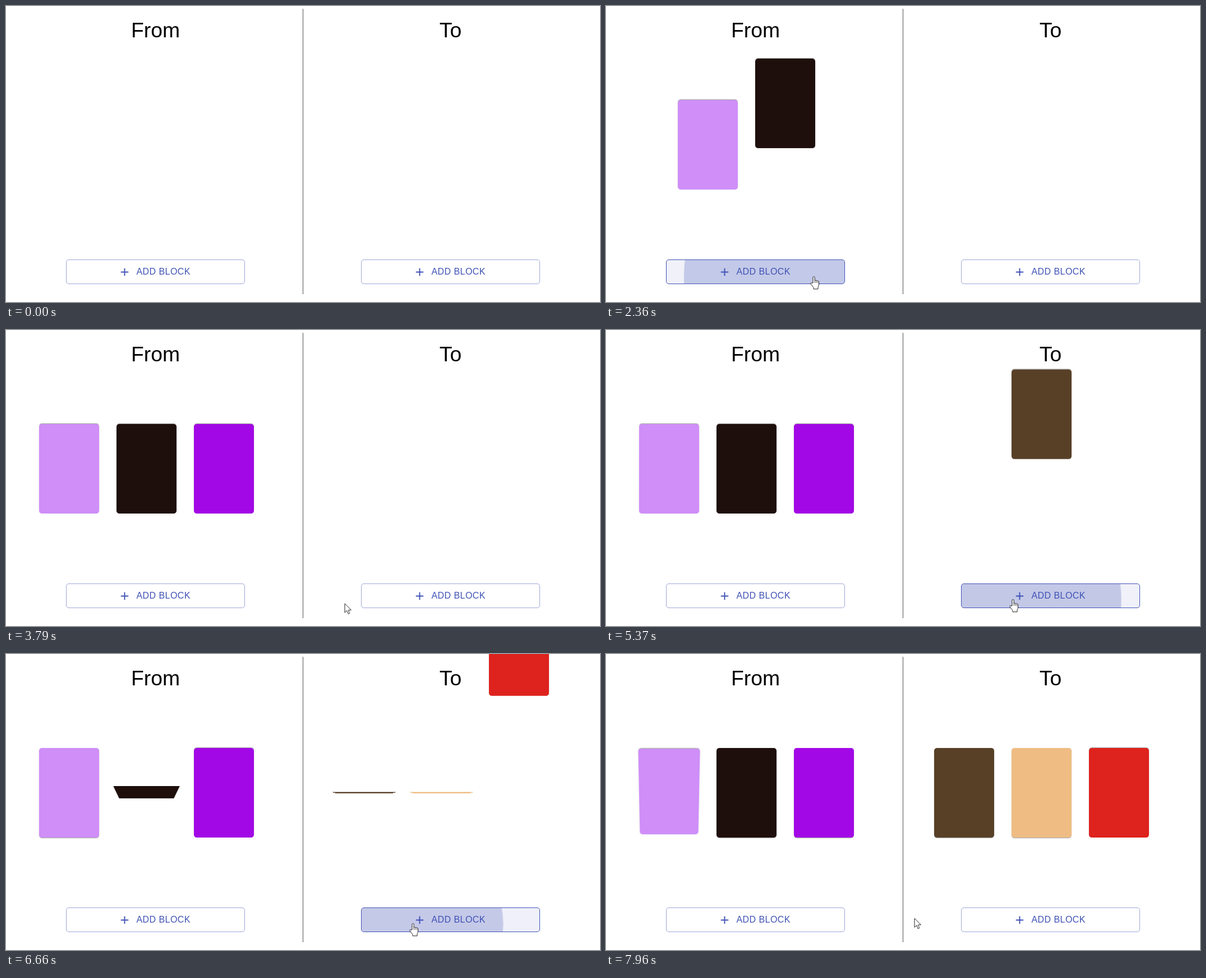
These frames come from a looping animation (1059x529 px, 7.99 s). An HTML page:

```html
<!DOCTYPE html>
<html lang="en">
<head>
<meta charset="utf-8">
<title>From / To blocks</title>
<style>
  html, body { margin: 0; width: 100%; height: 100%; overflow: hidden; background: #fff; }
  body { position: relative; font-family: "Liberation Sans", Arial, sans-serif; }
  body * { position: absolute; box-sizing: border-box; }
  h1 { margin: 0; top: 20.5px; width: 200px; font-size: 37.3px; line-height: 44px; font-weight: 400; text-align: center; color: #000; }
  .divider { left: 528px; top: 5px; width: 3px; height: 510px; background: #9e9e9e; border: solid #cfcfcf; border-width: 0 1px; }
  .button { top: 453px; width: 319px; height: 44px; border: 1px solid; border-radius: 5px; overflow: hidden; color: #3f51b5; }
  .button svg { left: 92.2px; top: 9.7px; width: 23px; height: 23px; fill: currentColor; }
  .button b { left: 124.4px; top: -.6px; font-size: 16px; line-height: 44px; font-weight: 400; letter-spacing: .02857em; white-space: nowrap; }
  .ripple { inset: 0; }
  .ripple i { border-radius: 50%; background: currentColor; }
  .card { top: 167.6px; width: 106.5px; height: 160px; }
  .face { inset: 0; border-radius: 5px; box-shadow: 0 2px 1px -1px rgba(0,0,0,.2), 0 1px 1px rgba(0,0,0,.14), 0 1px 3px rgba(0,0,0,.12); }
  .cursor { left: 0; top: 0; width: 0; height: 0; }
  .cursor svg { overflow: visible; width: 24px; height: 26px; fill: #fff; stroke: #222; stroke-linejoin: round; }
  .arrow { left: 0; top: 0; }
  .hand { left: -6.4px; top: -.8px; }
</style>
</head>
<body>
<div class="divider"></div>
<script>
const LOOP = 7990;
const STANDARD = 'cubic-bezier(.4,0,.2,1)';
const SLIDE = 'cubic-bezier(0,0,.2,1)';
const EASE_HEAD = 'cubic-bezier(.31,.089,.366,.76)'; // first 66% of "ease"
const HOLD = 'steps(1)';
const PRESS = 232; // time from pointer down to pointer up
const GAP = 138, CARD_W = 106.5;

const sides = [
  { title: 'From', mid: 266.5, cardMid: 250.6, tip: [369, 484], hover: [620, 3300],
    clicks: [1110, 2034, 2460],
    cards: [['#cf8ef8', 5365, 7330], ['#1e0f0c', 6345], ['#a208e6', 6735]] },
  { title: 'To', mid: 792.5, cardMid: 776.5, tip: [724, 482], hover: [4665, 7660],
    clicks: [5060, 5963, 6413],
    cards: [['#584027', 6365], ['#efbd84', 6365], ['#de221d']] }
];

function add(parent, tag, name = '', html = '') {
  const el = document.createElement(tag);
  el.className = name;
  el.innerHTML = html;
  parent.append(el);
  return el;
}

// steps: [ms, properties, easing towards the next step]
function play(el, steps) {
  const all = [[0, steps[0][1]], ...steps, [LOOP, steps[steps.length - 1][1]]];
  el.animate(all.map(([t, props, easing = HOLD]) => ({ ...props, offset: t / LOOP, easing })),
    { duration: LOOP, iterations: Infinity });
}

function addRipple(button, [x, y], down) {
  const r = Math.hypot(Math.max(x, 317 - x) * 2 + 2, Math.max(y, 42 - y) * 2 + 2) / 2;
  const wrap = add(button, 'span', 'ripple');
  const dot = add(wrap, 'i');
  const up = down + PRESS;
  Object.assign(dot.style, { left: x - r + 'px', top: y - r + 'px', width: 2 * r + 'px', height: 2 * r + 'px' });
  play(wrap, [[0, { opacity: 0 }], [down, { opacity: 1 }], [up, { opacity: 1 }, STANDARD], [up + 550, { opacity: 0 }]]);
  play(dot, [[down, { transform: 'scale(0)', opacity: .1 }, STANDARD], [down + 550, { transform: 'scale(1)', opacity: .3 }]]);
}

function addButton({ mid, tip, hover: [enter, leave], clicks }) {
  const button = add(document.body, 'div', 'button',
    '<svg viewBox="0 0 24 24"><path d="M19 13h-6v6h-2v-6H5v-2h6V5h2v6h6v2z"/></svg><b>ADD BLOCK</b>');
  const left = mid - 159.5;
  button.style.left = left + 'px';
  const off = { backgroundColor: 'rgba(63,81,181,0)', borderColor: 'rgba(63,81,181,.5)' };
  const on = { backgroundColor: 'rgba(63,81,181,.08)', borderColor: 'rgba(63,81,181,1)' };
  play(button, [[enter, off, STANDARD], [enter + 250, on], [leave, on, STANDARD], [leave + 250, off]]);
  for (const down of clicks) addRipple(button, [tip[0] - left - 1, tip[1] - 454], down);
}

function addCard({ cardMid, clicks }, index, [color, ...flips]) {
  const card = add(document.body, 'div', 'card');
  const face = add(card, 'div', 'face');
  face.style.background = color;

  const place = n => ({ left: cardMid + (index - (n - 1) / 2) * GAP - CARD_W / 2 + 'px' });
  play(card, clicks.map((down, k) => [down + PRESS, place(Math.max(k, index) + 1)]));

  const start = clicks[index] + PRESS;
  play(card, [[start, { translate: '0 -330px' }, SLIDE], [start + 225, { translate: '0 0px' }]]);

  const turn = a => ({ transform: `perspective(800px) rotateX(${a}deg)` });
  const steps = [[0, turn(-180)]];
  flips.forEach((t, k) => {
    const from = k * 180 - 180;
    if (t + 1000 > LOOP) steps.push([t, turn(from), EASE_HEAD], [LOOP, turn(from + 165.9)]);
    else steps.push([t, turn(from), 'ease'], [t + 1000, turn(from + 180)]);
  });
  play(face, steps);
}

function addCursor() {
  const cursor = add(document.body, 'div', 'cursor',
    '<svg class="arrow"><path d="M.5 .5V16.5L4.2 13L6.6 18.9L9.2 17.8L6.9 12H12Z"/></svg>' +
    '<svg class="hand"><path d="M6 12V2.2a1.6 1.6 0 0 1 3.2 0V8a1.4 1.4 0 0 1 2.6 .4a1.3 1.3 0 0 1 2.5 .6a1.2 1.2 0 0 1 2.2 .9V15c0 2-1.5 3.5-1.5 5v2.8H7V20.5C6 18.5 3 15.5 2 13.6c-.8-1.5 .8-2.6 2-1.5z"/>' +
    '<path d="M9.2 8v4M11.8 8.6v3.4M14.3 9.4v2.8" stroke-width=".8"/></svg>');
  const [arrow, hand] = cursor.children;
  const at = (x, y) => ({ translate: `${x}px ${y}px` });
  const fromTip = at(...sides[0].tip), toTip = at(...sides[1].tip);
  play(cursor, [
    [500, at(536, 512), 'ease-out'], [740, fromTip],
    [3230, fromTip, 'ease-in'], [3310, at(424, 499), 'linear'], [3400, at(490, 502), 'linear'],
    [3550, at(618, 489)], [3700, at(618, 489), 'linear'], [3790, at(603.5, 488.5)],
    [4610, at(603.5, 488.5), 'linear'], [4665, at(634, 487), 'ease-out'], [4850, toTip],
    [7510, toTip, 'ease-in'], [7660, at(634, 479), 'ease-out'], [7960, at(549.5, 472)]
  ]);
  play(cursor, [[0, { opacity: 0 }], [500, { opacity: 1 }]]);
  const swaps = sides.flatMap(s => s.hover);
  const toggle = first => [0, ...swaps].map((t, k) => [t, { opacity: (k + first) % 2 }]);
  play(arrow, toggle(1));
  play(hand, toggle(0));
}

for (const side of sides) {
  const title = add(document.body, 'h1', '', side.title);
  title.style.left = side.mid - 100 + 'px';
  addButton(side);
  side.cards.forEach((card, i) => addCard(side, i, card));
}
addCursor();
</script>
</body>
</html>
```
